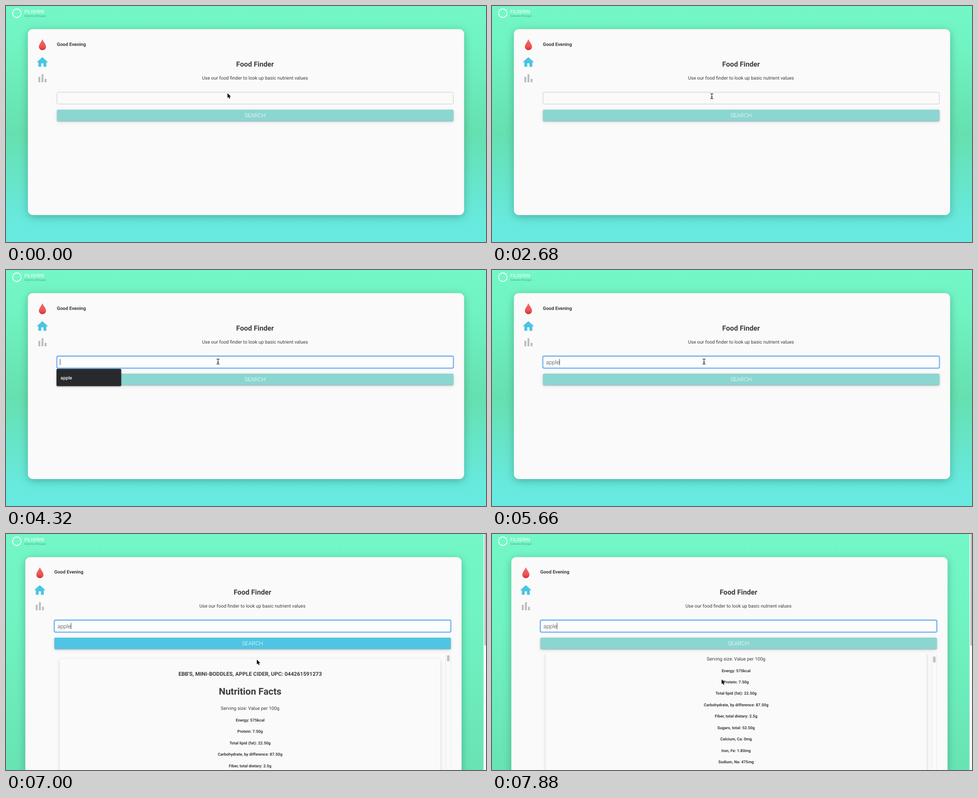
Recreate the animation shown at these times as an HTML page. Size 1064 by 526 pixels, loop 8000 ms.

```html
<!DOCTYPE html>
<html lang="en">
<head>
<meta charset="utf-8">
<title>Food Finder</title>
<style>
html, body { margin: 0; height: 100%; overflow: hidden; }
svg { display: block; width: 100vw; height: 100vh; }
text { font-family: Roboto, sans-serif; font-size: 10.43px; fill: #3c3c3c; text-rendering: geometricPrecision; }
.mid { text-anchor: middle; }
.bold { font-weight: 700; }
.light { font-weight: 300; font-size: 12.5px; }
.card { fill: #fafafa; filter: drop-shadow(0 4px 9px rgba(0, 50, 35, .3)); }
.button { filter: drop-shadow(0 1px 1px rgba(0, 0, 0, .28)) drop-shadow(0 2px 4px rgba(0, 0, 0, .1)); }
.facts { fill: #fafafa; filter: drop-shadow(0 1px 1px rgba(0, 0, 0, .18)) drop-shadow(0 2px 4px rgba(0, 0, 0, .1)); }
.menu { fill: #28292d; filter: drop-shadow(0 1px 1.5px rgba(0, 0, 0, .35)); }
</style>
</head>
<body>
<svg viewBox="0 0 1064 526" preserveAspectRatio="none">
  <defs>
    <linearGradient id="sky" x2="0" y2="1">
      <stop stop-color="#73f7c6"/>
      <stop offset=".15" stop-color="#71f4c3"/>
      <stop offset=".54" stop-color="#66e0b0"/>
      <stop offset=".9" stop-color="#67e9dd"/>
      <stop offset="1" stop-color="#68eae2"/>
    </linearGradient>
    <linearGradient id="blood" x2="0" y2="1">
      <stop stop-color="#f16a6a"/>
      <stop offset=".65" stop-color="#ec5555"/>
      <stop offset="1" stop-color="#cf3434"/>
    </linearGradient>
    <clipPath id="window"><rect x="112" y="268" width="888" height="258"/></clipPath>
  </defs>

  <rect id="backdrop" width="1064" height="526" fill="url(#sky)"/>
  <circle cx="24" cy="16" r="9.5" fill="none" stroke="#fff" stroke-width="1.8"/>
  <text x="40.7" y="16" style="fill:#fff">FILDERIN</text>
  <text x="40.7" y="23.7" style="font-size:5.9px;fill:#4fa98c">Diabetes Manager</text>

  <g id="page">
    <rect id="card" class="card" x="48.5" y="51.5" width="967" height="414.5" rx="11"/>
    <path d="M80.8 74C83 80 88.7 85.500 88.700 91A7.900 7.400 0 0 1 72.900 91C72.900 85.500 78.600 80 80.800 74Z" fill="url(#blood)"/>
    <path transform="translate(65.5 110.200) scale(1.260)" d="M10 20v-6h4v6h5v-8h3L12 3 2 12h3v8z" fill="#4ac4e3"/>
    <path transform="translate(67.200 147.500) scale(1.130)" d="M4 9h3.700v11H4zM16.300 13H20v7h-3.700zM10.200 4h3.700v16h-3.700z" fill="#bdbdbd"/>
    <text id="greeting" class="bold" x="112.800" y="89">Good Evening</text>
    <text class="mid bold" x="552" y="135.300" style="font-size:15.650px">Food Finder</text>
    <text class="mid" x="552" y="163.600">Use our food finder to look up basic nutrient values</text>

    <rect id="glow" x="112.500" y="191.500" width="879.500" height="27.500" rx="3" fill="none" stroke="#c3def9" stroke-width="3.500"/>
    <rect id="field" x="113" y="192.200" width="878.500" height="26.300" rx="2.500"/>
    <text id="query" class="light" x="119.700" y="209.700"></text>
    <rect id="caret" y="198.300" width="1" height="13.700" fill="#333"/>

    <rect id="button" class="button" x="113" y="231" width="878.800" height="25.500" rx="2.500"/>
    <text class="mid light" x="552" y="248" style="fill:#fff">SEARCH</text>

    <g id="menu">
      <rect class="menu" x="112" y="220.300" width="143.300" height="38.500" rx="2.500"/>
      <text x="121" y="243.600" style="fill:#f4f4f4;font-weight:500">apple</text>
    </g>

    <g id="results" clip-path="url(#window)">
      <g id="content">
        <rect class="facts" x="124.300" y="279" width="845" height="700" rx="2"/>
        <text class="mid bold" x="546.800" y="316.400" style="font-size:12px">EBB'S, MINI-BODDLES, APPLE CIDER, UPC: 044261591273</text>
        <text class="mid bold" x="546.800" y="358.400" style="font-size:20.860px">Nutrition Facts</text>
        <text class="mid" x="546.800" y="392">Serving size: Value per 100g</text>
      </g>
      <rect x="980.500" y="268" width="11" height="258" fill="#fafafa"/>
      <path d="M980.500 268V526M991.500 268V526" stroke="#e7e7e7"/>
      <rect id="thumb" x="983.200" y="270" width="5.800" height="14" rx="2.900" fill="#c1c1c1"/>
    </g>
  </g>

  <g id="scrollbar">
    <rect x="1058.500" width="5.500" height="526" fill="#fafafa"/>
    <rect x="1060.300" y="-4" width="3.700" height="253" rx="1.800" fill="#c1c1c1"/>
  </g>

  <path id="arrow" d="M0 0V10.500L2.400 8.300 4 12 5.900 11.200 4.300 7.600H7.600Z" stroke="#fff" stroke-width=".9" paint-order="stroke"/>
  <g id="beam" fill="none" stroke-linecap="round">
    <path d="M-2.800-5.700Q0-5.700 0-4Q0-5.700 2.800-5.700M0-4V4M-2.800 5.700Q0 5.700 0 4Q0 5.700 2.800 5.700M-1.500 1.500H1.500" stroke="#222" stroke-width="1.200"/>
  </g>
</svg>
<script>
const LOOP = 8000, FOCUS = 3420, LOADED = 7000;
const el = Object.fromEntries([...document.querySelectorAll('[id]')].map(e => [e.id, e]));

const facts = ['Energy: 575kcal', 'Protein: 7.50g', 'Total lipid (fat): 22.50g',
  'Carbohydrate, by difference: 87.50g', 'Fiber, total dietary: 2.5g', 'Sugars, total: 52.50g',
  'Calcium, Ca: 0mg', 'Iron, Fe: 1.80mg', 'Sodium, Na: 475mg'];
facts.forEach((fact, i) => {
  const row = document.createElementNS('http://www.w3.org/2000/svg', 'text');
  row.setAttribute('class', 'mid bold');
  row.setAttribute('x', 546.8);
  row.setAttribute('y', 418 + i * 25.44);
  row.style.fontSize = '8.9px';
  row.textContent = fact;
  el.content.append(row);
});

// Each step: start time, then the values held until the next step.
const pointer = [
  [0, 'arrow', 491, 194.5], [900, 'arrow', 498, 200], [1040, 'arrow', 499, 207],
  [1190, 'beam', 490, 204], [2680, 'beam', 487.3, 201], [2830, 'beam', 473, 201],
  [2980, 'beam', 470, 204], [6850, 'beam', 473.8, 204],
  [7000, 'arrow', 556, 280], [7140, 'arrow', 562, 286.500], [7290, 'arrow', 550, 296.500],
  [7440, 'arrow', 509, 324]
];
const typing = [[0, 0], [4610, 1], [4910, 2], [5060, 3], [5360, 4], [5660, 5]];
const caretOn = [[0, false], [3420, true], [3870, false], [4320, true], [6110, false],
  [6550, true], [7140, false], [7580, true]];
const scrolling = [[0, 0], [7730, 36], [7880, 110.4]];

const at = (steps, t) => steps.findLast(s => s[0] <= t).slice(1);
const show = (e, on) => e.setAttribute('display', on ? 'inline' : 'none');
const set = (e, attrs) => { for (const k in attrs) e.setAttribute(k, attrs[k]); };
const move = (e, x, y) => set(e, { transform: `translate(${x} ${y})` });

function draw(t) {
  const focused = t >= FOCUS, loaded = t >= LOADED;

  set(el.backdrop, { height: loaded ? 1115 : 526 });
  set(el.card, { height: loaded ? 1000 : 414.5 });
  set(el.greeting, { y: loaded ? 88.3 : 89 });
  move(el.page, loaded ? -5.7 : 0, 0);
  show(el.results, loaded);
  show(el.scrollbar, loaded);

  show(el.glow, focused);
  set(el.field, {
    fill: focused ? '#fdfdfd' : '#fafafa',
    stroke: focused ? '#4a9bee' : '#c8c8c8',
    'stroke-width': focused ? 1.4 : 1
  });
  set(el.button, { fill: loaded && t < 7140 ? '#4fc5e3' : '#8bd6d1' });
  show(el.menu, focused && t < 5660);

  el.query.textContent = 'apple'.slice(0, at(typing, t)[0]);
  set(el.caret, { x: 119.5 + el.query.getComputedTextLength() });
  show(el.caret, at(caretOn, t)[0]);

  const [scroll] = at(scrolling, t);
  move(el.content, 0, -scroll);
  move(el.thumb, 0, scroll * .025);

  const [shape, x, y] = at(pointer, t);
  for (const name of ['arrow', 'beam']) show(el[name], name === shape);
  move(el[shape], x, y);
}

const start = performance.now();
function tick() {
  draw((performance.now() - start) % LOOP);
  requestAnimationFrame(tick);
}
tick();
</script>
</body>
</html>
```
